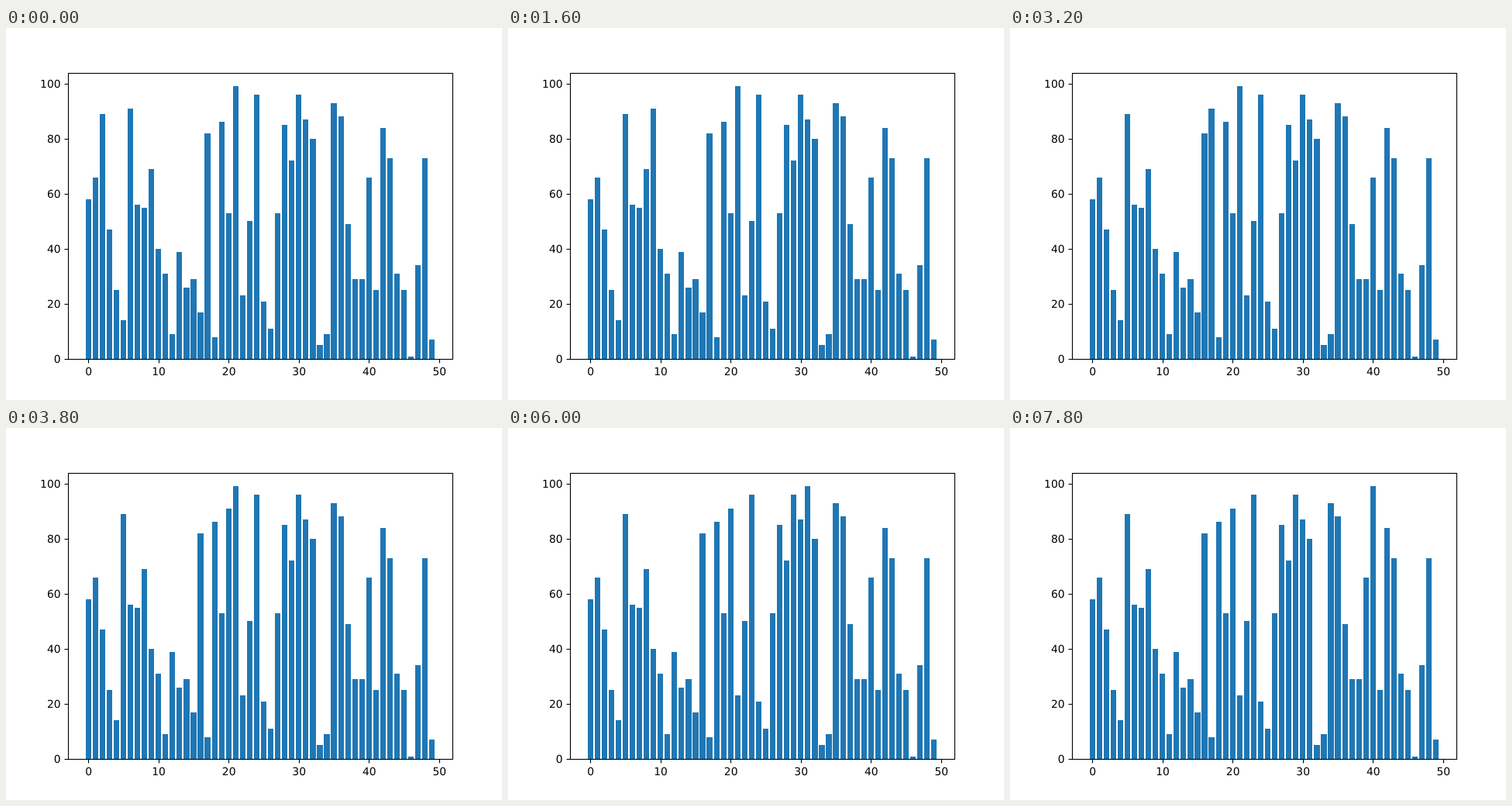
Write an HTML page that moves like this. It is 640 px wide and 480 px high and loops after 8 s.

```html
<!DOCTYPE html>
<html lang="en">
<head>
<meta charset="utf-8">
<title>Bubble sort pass</title>
<style>
  html, body { margin: 0; width: 100%; height: 100%; overflow: hidden; background: #fff; }
  svg { display: block; width: 640px; height: 480px; }
  text { font: 13.889px "DejaVu Sans", sans-serif; text-rendering: geometricPrecision; }
</style>
</head>
<body>
<svg viewBox="0 0 640 480">
  <g id="bars" fill="#1f77b4"></g>
  <g id="axes" fill="none" stroke="#000" stroke-width="1.11">
    <rect x="80.5" y="58.5" width="496" height="369"/>
  </g>
  <g id="labels"></g>
</svg>
<script>
const values = [
  58, 66, 89, 47, 25, 14, 91, 56, 55, 69, 40, 31, 9, 39, 26, 29, 17,
  82, 8, 86, 53, 99, 23, 50, 96, 21, 11, 53, 85, 72, 96, 87, 80, 5,
  9, 93, 88, 49, 29, 29, 66, 25, 84, 73, 31, 25, 1, 34, 73, 7
];
const STEP = 200, LOOP = 8000, BASE = 427;

// Plot area with a 5% margin around the data
const toX = v => 80 + (v + 2.89) * 496 / 54.78;
const toY = v => 427.2 - v * 369.6 / 103.95;

function add(parent, tag, attrs, text = "") {
  const el = document.createElementNS("http://www.w3.org/2000/svg", tag);
  for (const key in attrs) el.setAttribute(key, attrs[key]);
  el.textContent = text;
  return document.getElementById(parent).appendChild(el);
}

for (let v = 0; v <= 50; v += 10) {
  const x = Math.round(toX(v)) + 0.5;
  add("axes", "path", { d: `M${x} 427.5V432.5` });
  add("labels", "text", { x: toX(v) + 0.4, y: 448, "text-anchor": "middle" }, v);
}
for (let v = 0; v <= 100; v += 20) {
  const y = Math.round(toY(v)) + 0.5;
  add("axes", "path", { d: `M75.5 ${y}H80.5` });
  add("labels", "text", { x: 70.6, y: Math.round(toY(v) + 5.2), "text-anchor": "end" }, v);
}

const bars = values.map((_, i) => {
  const left = Math.round(toX(i - 0.4));
  return add("bars", "rect", { x: left, width: Math.round(toX(i + 0.4)) - left });
});

// Each step compares one neighbouring pair, carrying the larger value right
function sortPass(steps) {
  const list = values.slice();
  for (let i = 0; i <= steps; i++) {
    if (list[i] > list[i + 1]) [list[i], list[i + 1]] = [list[i + 1], list[i]];
  }
  return list;
}

let shown = -1;
function render(time) {
  const step = Math.floor((time % LOOP) / STEP);
  if (step === shown) return;
  shown = step;
  sortPass(step).forEach((v, i) => {
    const top = Math.round(toY(v));
    bars[i].setAttribute("y", top);
    bars[i].setAttribute("height", BASE - top);
  });
}

const start = performance.now();
function tick() {
  render(performance.now() - start);
  requestAnimationFrame(tick);
}
tick();
</script>
</body>
</html>
```
